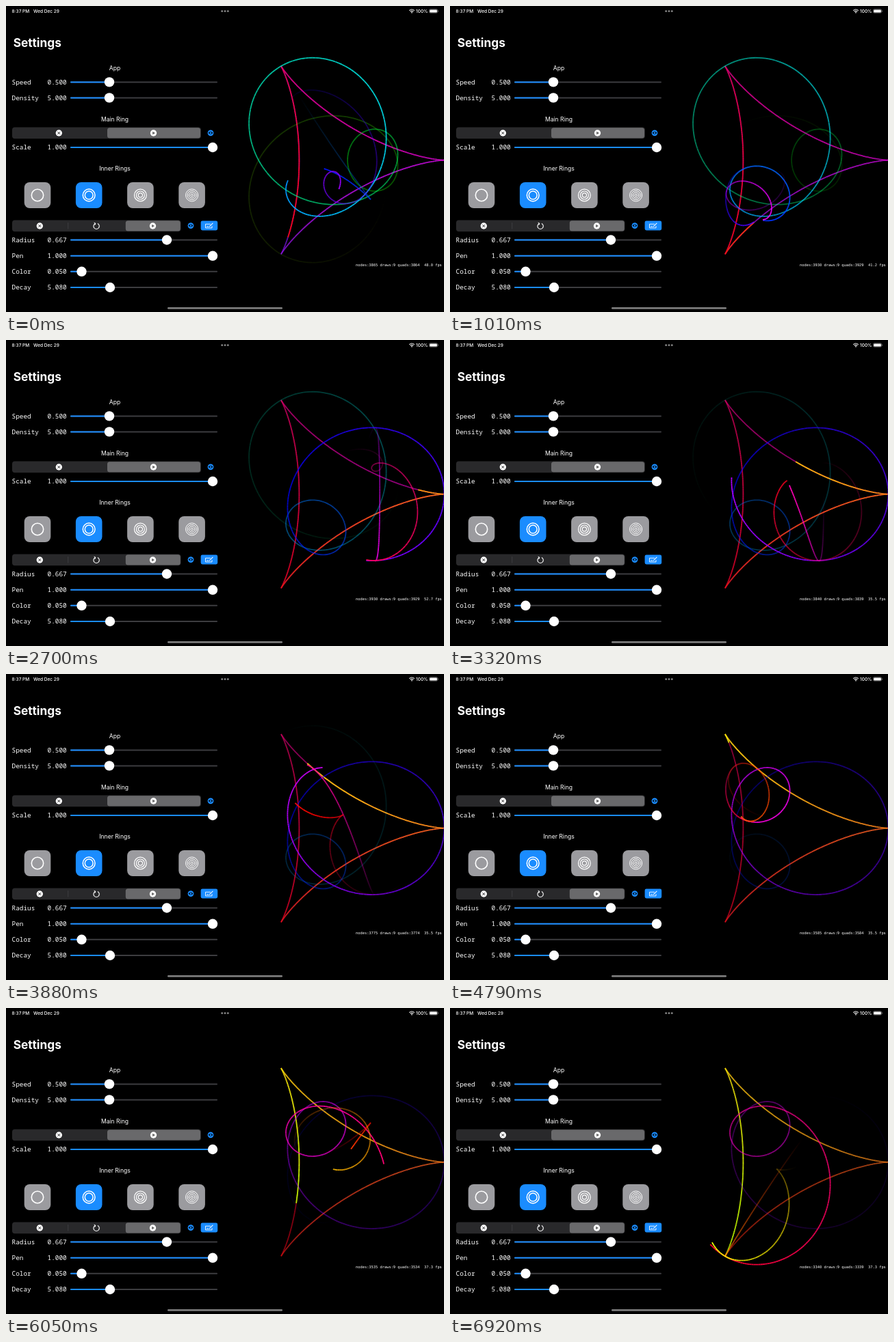
An HTML page with a canvas that plays this animation: 640x448 px, repeating every 7.02 s.

```html
<!DOCTYPE html>
<html lang="en">
<head>
<meta charset="utf-8">
<title>Ring settings</title>
<style>
  html, body { margin: 0; width: 640px; height: 448px; overflow: hidden; background: #000; }
  canvas, svg { position: absolute; left: 0; top: 0; display: block; }
  text { fill: #fff; white-space: pre; font-family: Inter, "Open Sans", sans-serif; }
  .mono { font: 9.4px "Noto Sans Mono", "DejaVu Sans Mono", monospace; }
  .head { font-size: 8.6px; text-anchor: middle; }
  .status { font-size: 6.5px; font-weight: 500; }
  .stats { font: 5.37px "DejaVu Sans Mono", monospace; }
</style>
</head>
<body>
<canvas id="trails" width="640" height="448"></canvas>
<svg id="panel" width="640" height="448" viewBox="0 0 640 448"></svg>
<script>
const BLUE = '#1a8cff';

// ---- Settings panel ----
const box = (x, y, w, h, r, fill) =>
  `<rect x="${x}" y="${y}" width="${w}" height="${h}" rx="${r}" fill="${fill}"/>`;
const dot = (x, y, r, fill) => `<circle cx="${x}" cy="${y}" r="${r}" fill="${fill}"/>`;
const ring = (x, y, r, w) =>
  `<circle cx="${x}" cy="${y}" r="${r}" fill="none" stroke="#fff" stroke-width="${w}"/>`;
const line = (d, color, w) =>
  `<path d="${d}" fill="none" stroke="${color}" stroke-width="${w}" stroke-linecap="round"/>`;
const label = (x, y, cls, s, extra = '') => `<text x="${x}" y="${y}" class="${cls}" ${extra}>${s}</text>`;

const slider = (y, name, value, x) =>
  label(8.5, y + 3.4, 'mono', name) + label(60.5, y + 3.4, 'mono', value) +
  box(94, y - 1, 215, 2, 1, '#3d3d40') + box(94, y - 1, x - 94, 2, 1, BLUE) + dot(x, y, 7.2, '#fff');

const cross = (x, y) => dot(x, y, 4.7, '#fff') +
  line(`M${x - 1.6} ${y - 1.6}l3.2 3.2m0-3.2l-3.2 3.2`, '#2a2a2c', 1);
const play = (x, y) => dot(x, y, 4.7, '#fff') +
  `<path d="M${x - 1.4} ${y - 2.3}l4 2.3l-4 2.3z" fill="#666"/>`;
const eye = (x, y) => dot(x, y, 4.4, BLUE) +
  `<path d="M${x - 3.4} ${y}q3.4-4 6.8 0q-3.4 4-6.8 0z" fill="#000"/>` + dot(x, y, 1.4, BLUE);

const ringButton = (i, radii, w) => {
  const x = 46 + 75.2 * i;
  return box(x - 19.3, 258, 38.6, 38, 8, i === 1 ? BLUE : '#9b9b9f') +
    radii.map(r => ring(x, 277, r, w)).join('');
};

document.getElementById('panel').innerHTML = [
  // status bar
  label(8.5, 9.8, 'status', '8:37 PM'), label(40, 9.8, 'status', 'Wed Dec 29'),
  ...[315.7, 320, 324.3].map(x => dot(x, 7.6, 1.4, '#8c8c8c')),
  line('M589.6 6.4q3.4-2.9 6.8 0M591 8q2-1.6 4 0', '#fff', 1.1), dot(593, 9.5, 0.9, '#fff'),
  label(599, 9.8, 'status', '100%'),
  `<rect x="618.4" y="4.6" width="12.2" height="5.6" rx="1.7" fill="none" stroke="#888" stroke-width=".6"/>`,
  box(619.2, 5.4, 10.6, 4, 1, '#fff'), box(631.3, 6.4, 0.8, 2, 0.4, '#888'),

  label(10.7, 60, '', 'Settings', 'font-size="17.3" font-weight="700"'),
  label(159, 94, 'head', 'App'),
  slider(111.4, 'Speed', '0.500', 151),
  slider(134.4, 'Density', '5.000', 151),

  label(159, 168.6, 'head', 'Main Ring'),
  box(9, 177.5, 276, 16.7, 4, '#29292b'), box(148, 178.3, 136, 15.2, 3.5, '#69696b'),
  cross(77.3, 186), play(215.5, 186), eye(299, 185.8),
  slider(207, 'Scale', '1.000', 302),

  label(159, 240.6, 'head', 'Inner Rings'),
  ringButton(0, [8.7], 1.6),
  ringButton(1, [8.9, 5.9], 1.5),
  ringButton(2, [8.9, 6, 3.1], 1.2),
  ringButton(3, [9, 6.6, 4.2, 1.8], 1),

  box(9, 313.5, 246.5, 16.7, 4, '#29292b'), box(174.8, 314.3, 80, 15.2, 3.5, '#69696b'),
  box(90.4, 317, 0.8, 9.5, 0, '#444446'),
  cross(49.3, 322),
  line('M134.3 318.7a4.2 4.2 0 1 1-4.4 0', '#fff', 1.1),
  line('M129 317.4l2 1l-1 2', '#fff', 1),
  play(214.5, 322), eye(270, 321.6),
  box(284.6, 314.6, 24.6, 13.8, 2.4, BLUE),
  line('M298.5 319.3h-7v5.6h9.5v-2.5M293.5 322.8h2.5', '#fff', 0.9),
  line('M297.5 322.6l4.5-4.5', '#fff', 1.1),

  slider(342.5, 'Radius', '0.667', 235),
  slider(365.8, 'Pen', '1.000', 302),
  slider(388.8, 'Color', '0.050', 110.5),
  slider(412, 'Decay', '5.080', 152),

  box(236, 441, 168, 2.8, 1.4, '#7c7c7c'),
  label(511, 381.2, 'stats', '', 'id="stats"'),
].join('');

// ---- Timeline ----
const LOOP = 7020;
// bursts of picture updates: first time, last time, count
const steps = [
  [0, 0, 1], [110, 780, 7], [890, 1570, 7], [1690, 2360, 7], [2470, 2700, 3], [2870, 3540, 7],
  [3650, 4350, 7], [4460, 5010, 6], [5160, 5830, 7], [5940, 6170, 3], [6360, 6920, 6],
].flatMap(([a, b, n]) => Array.from({ length: n }, (_, i) => a + (b - a) * i / Math.max(1, n - 1)));

// time, rotation in degrees; the speed follows the frame rate
const turns = [[-1000, -217], [0, -144], [1010, -82], [2700, 29], [3880, 90], [4790, 137], [6050, 202.5], [6920, 245]];
const nodes = [[0, 3865], [1010, 3930], [2700, 3930], [3880, 3760], [4790, 3585], [6050, 3530], [6920, 3340]];
const rates = [[0, '48.0'], [600, '41.2'], [1690, '52.7'], [2870, '35.5'], [5160, '37.3']];

// piecewise linear, continued beyond both ends
function along(keys, ms) {
  let i = 1;
  while (i < keys.length - 1 && ms > keys[i][0]) i++;
  const [a, u] = keys[i - 1], [b, v] = keys[i];
  return u + (v - u) * (ms - a) / (b - a);
}

// ---- Nested rolling rings ----
const CX = 481.4, CY = 225.7, RATIO = 2 / 3;
const radius = [159], spin = [-2];
for (let k = 1, turn = -2; k <= 4; k++) {
  turn /= -RATIO;
  radius.push(radius[k - 1] * RATIO);
  spin.push(spin[k - 1] + turn);
}

const pens = [
  { decay: 12000, hue: 0.09, drift: 0.00064 },
  { decay: 5080, hue: 0.722, drift: 0.00103 },
  { decay: 1050, hue: 0.815, drift: 0.00112 },
  { decay: 1200, hue: 0.92, drift: 0.00104 },
];

function penPoint(k, deg) {
  const t = (deg + 720) * Math.PI / 180;
  let x = CX, y = CY;
  for (let j = 0; j <= k; j++) {
    const arm = j < k ? radius[j] - radius[j + 1] : radius[k];
    x += arm * Math.cos(spin[j] * t);
    y -= arm * Math.sin(spin[j] * t);
  }
  return [x, y];
}

const ctx = document.getElementById('trails').getContext('2d');
const stats = document.getElementById('stats');

function draw(ms) {
  ctx.clearRect(0, 0, 640, 448);
  ctx.lineWidth = 1.8;
  pens.forEach(({ decay, hue, drift }, i) => {
    const count = Math.ceil(decay / 12);
    let last;
    for (let n = 0; n <= count; n++) {
      const life = n / count;
      const deg = along(turns, ms - decay * (1 - life));
      const p = penPoint(i + 1, deg);
      if (last) {
        const h = ((hue + drift * deg + 2) % 1) * 360;
        ctx.strokeStyle = `hsla(${h.toFixed(1)}, 100%, 50%, ${life.toFixed(3)})`;
        ctx.beginPath();
        ctx.moveTo(...last);
        ctx.lineTo(...p);
        ctx.stroke();
      }
      last = p;
    }
  });
  const total = Math.round(along(nodes, ms) / 5) * 5;
  const fps = rates.filter(([from]) => from <= ms).pop()[1];
  stats.textContent = `nodes:${total} draws:9 quads:${total - 1}  ${fps} fps`;
}

let shown = -1;
function tick() {
  const now = performance.now() % LOOP;
  const step = steps.filter(s => s <= now).pop();
  if (step !== shown) draw(shown = step);
  requestAnimationFrame(tick);
}
tick();
</script>
</body>
</html>
```
